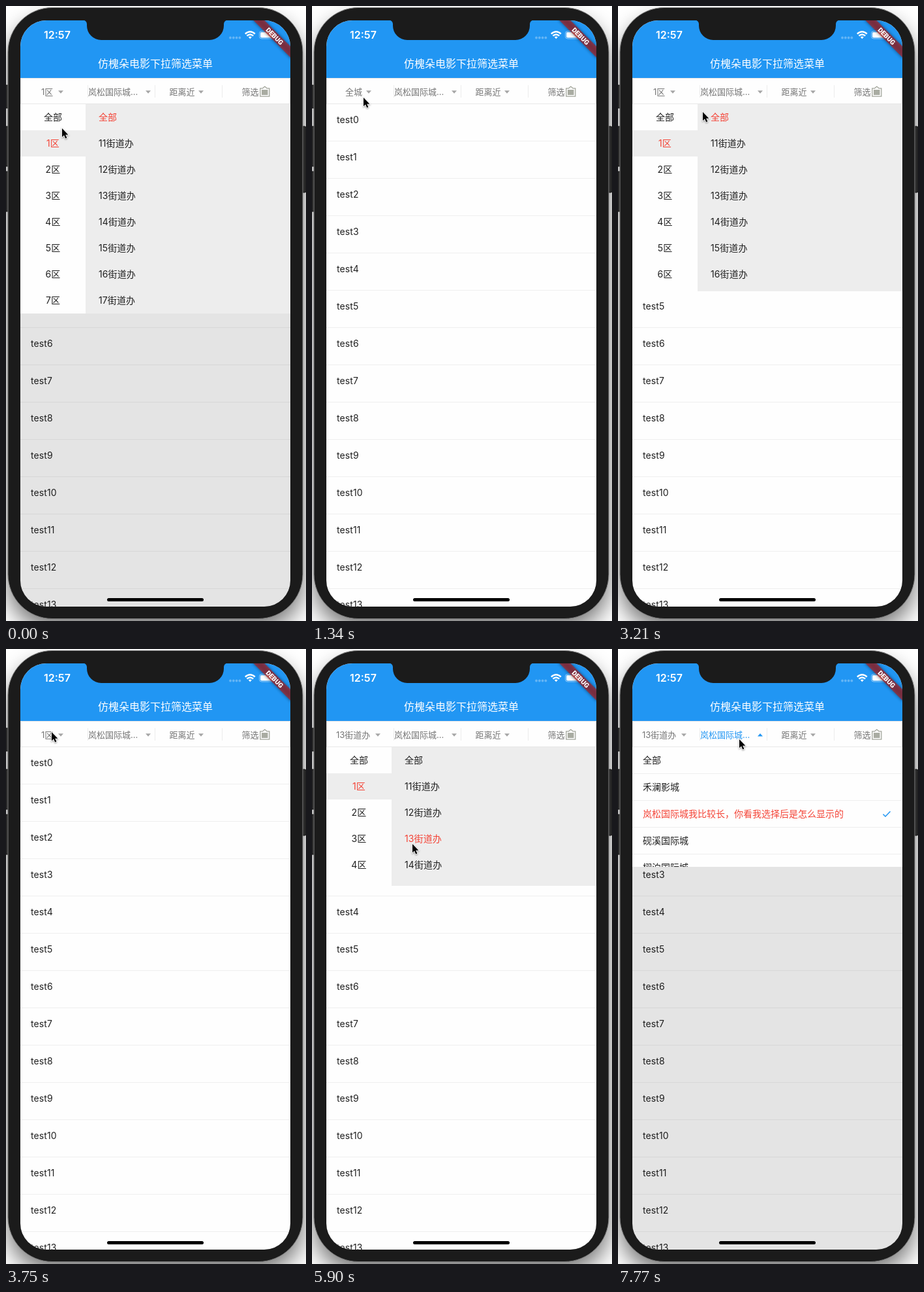
Recreate the animation shown at these times as an HTML page. Size 460 px wide and 940 px high, loop 8000 ms.

```html
<!DOCTYPE html>
<html lang="zh-CN">
<head>
<meta charset="utf-8">
<title>下拉筛选菜单</title>
<style>
  html, body { margin: 0; width: 100%; height: 100%; overflow: hidden; background: #fff; }
  svg { display: block; width: 460px; height: 940px; }
  text { font-family: Inter, "Noto Sans CJK SC", "Noto Sans CJK", sans-serif; font-size: 14px; fill: #212121; white-space: pre; }
  .mid { text-anchor: middle; }
  .spaced text { letter-spacing: .12px; }
  .tab { font-size: 13px; fill: #757575; }
  .caret { fill: #a6a6a6; }
  .on.tab, .on.caret { fill: #2196f3; }
  .red { fill: #f44336; }
</style>
</head>
<body>
<svg viewBox="0 0 460 940">
  <defs>
    <clipPath id="screen"><rect x="22" y="22" width="414" height="896" rx="40"/></clipPath>
    <clipPath id="reveal"><rect id="revealBox" x="22" y="150" width="414" height="0"/></clipPath>
    <filter id="blur" x="-20%" y="-20%" width="140%" height="140%"><feGaussianBlur stdDeviation="17"/></filter>
    <filter id="soft" x="-20%" y="-100%" width="140%" height="300%"><feGaussianBlur stdDeviation="2.5"/></filter>
  </defs>

  <rect width="460" height="940" fill="#fff"/>
  <rect x="3" y="22" width="452" height="930" rx="68" opacity=".55" filter="url(#blur)"/>
  <g fill="#2b2b2b" stroke="#111" stroke-width="1">
    <rect x="-3" y="121" width="8" height="35" rx="1.5"/>
    <rect x="-3" y="184" width="8" height="61" rx="1.5"/>
    <rect x="-3" y="253" width="8" height="61" rx="1.5"/>
    <rect x="453" y="184" width="7" height="101" rx="2"/>
  </g>
  <rect x="3" y="2.5" width="452" height="934" rx="68" fill="#1b1b1b" stroke="#7d7d7d" stroke-width="1"/>

  <g clip-path="url(#screen)">
    <rect x="22" y="22" width="414" height="896" fill="#fefefe"/>
    <g id="list" class="spaced"></g>
    <rect id="scrim" x="22" y="150" width="414" height="768" fill="#000" fill-opacity=".1"/>
    <g clip-path="url(#reveal)">
      <g id="areaMenu" class="spaced"></g>
      <g id="cinemaMenu"></g>
    </g>

    <rect x="22" y="22" width="414" height="88" fill="#2196f3"/>
    <text x="229" y="94" class="mid" style="font-size:16px;fill:#fff">仿槐朵电影下拉筛选菜单</text>
    <text x="58" y="50" style="font-size:16px;font-weight:600;fill:#fff">12:57</text>
    <g fill="#64b5f6" id="signal"></g>
    <g fill="none" stroke="#fff" stroke-width="2.4">
      <path d="M366.8 42.6Q374.3 35.8 381.8 42.6M369.4 45.6Q374.3 41.2 379.2 45.6"/>
      <path d="M374.3 50.2L371.8 47.6Q374.3 45.5 376.8 47.6Z" fill="#fff" stroke="none"/>
    </g>
    <rect x="388.5" y="38.5" width="23" height="11.5" rx="3.5" fill="none" stroke="#fff" stroke-opacity=".5"/>
    <rect x="390" y="40" width="20" height="8.5" rx="2" fill="#fff"/>
    <g transform="translate(436 22) rotate(45)">
      <rect x="-42" y="28" width="84" height="12" fill="#000" opacity=".5" filter="url(#soft)"/>
      <rect x="-42" y="28" width="84" height="12" fill="#b71c1c" fill-opacity=".627"/>
      <text y="37.7" class="mid" style="font-family:Roboto,sans-serif;font-size:10.2px;font-weight:900;fill:#fff">DEBUG</text>
    </g>

    <rect x="22.5" y="110.5" width="413" height="39" fill="#fefefe" stroke="#e8e8e8"/>
    <path d="M125.5 121V140M228.5 121V140M331.5 121V140" stroke="#ececec"/>
    <text id="areaTab" class="tab" y="136"></text>
    <path id="areaCaret" class="caret"/>
    <text id="cinemaTab" class="tab" x="126" y="136">岚松国际城...</text>
    <path id="cinemaCaret" class="caret"/>
    <text class="tab" x="250.5" y="136">距离近</text>
    <path id="sortCaret" class="caret"/>
    <text class="tab" x="361.5" y="136">筛选</text>
    <path d="M389.8 125.8H393.5L396.8 123L400.1 125.8H403.8V138.2H389.8Z" fill="none" stroke="#a2a59b" stroke-width="1.3"/>
    <rect x="392" y="128" width="9.5" height="8" fill="#a9aca2"/>
  </g>

  <path d="M118 21.5A6 6 0 0 1 124 27.500V30A22 22 0 0 0 146 52H312A22 22 0 0 0 334 30V27.500A6 6 0 0 1 340 21.500Z" fill="#1b1b1b"/>
  <rect x="155" y="905" width="148" height="5" rx="2.5"/>
  <g id="cursor">
    <path d="M0 -1V12.300L3 9.600L5.200 14.500L7.400 13.500L5.200 8.800H9.400Z"
          stroke="#fff" stroke-width="1.6" style="paint-order:stroke;filter:drop-shadow(0 1px 1px #0006)"/>
  </g>
</svg>

<script>
const LOOP = 8000, TOP = 150;
const $ = id => document.getElementById(id);
const range = n => [...Array(n).keys()];
const text = (x, y, s, cls = '') => `<text x="${x}" y="${y}" class="${cls}">${s}</text>`;
const rect = (x, y, w, h, fill) => `<rect x="${x}" y="${y}" width="${w}" height="${h}" fill="${fill}"/>`;

const CURSOR = [
  [0, 86, 188], [270, 78, 174], [540, 77, 169], [800, 79, 153], [1070, 81, 142], [1340, 79, 141],
  [1610, 80, 174], [1880, 82, 195], [2150, 81, 199], [2420, 82, 198], [2680, 125, 181],
  [2950, 148, 171], [3210, 130, 163], [3480, 85, 143], [3750, 70, 128], [4280, 71, 129],
  [4550, 113, 186], [4820, 162, 229], [5090, 155, 257], [5360, 154, 298], [5630, 154, 299],
  [6170, 157, 89], [6700, 189, 147], [6960, 176, 142], [7230, 186, 137], [7500, 186, 138], [7770, 186, 139]
];

// Each step changes only the fields it names.
const STEPS = [
  [0, { tab: '1区', active: '', menu: 'area', height: 320, scrim: true, left: 1, right: 0 }],
  [800, { tab: '全城', height: 158, scrim: false, left: 0 }],
  [1070, { height: 0 }],
  [1610, { active: 'area', height: 100, scrim: true }],
  [1880, { height: 279 }],
  [2150, { height: 320 }],
  [2420, { left: 1 }],
  [3210, { tab: '1区', active: '', height: 286, scrim: false }],
  [3480, { height: 107 }],
  [3750, { height: 0 }],
  [4280, { active: 'area', height: 200, scrim: true }],
  [4550, { height: 320 }],
  [5900, { tab: '13街道办', active: '', height: 212, scrim: false, right: 3 }],
  [6170, { height: 33 }],
  [6430, { height: 0 }],
  [7500, { active: 'cinema', menu: 'cinema', height: 2, scrim: true }],
  [7770, { height: 183 }]
];

// Label start and caret start for each caption of the first tab.
const TAB_X = { '1区': [54, 80], '全城': [51, 83], '13街道办': [37, 97] };
const CINEMAS = ['全部', '禾澜影城', '岚松国际城我比较长\uff0c你看我选择后是怎么显示的', '砚溪国际城', '栩泊国际城'];

function drawList() {
  $('list').innerHTML = range(14).map(i =>
    text(38, 179 + 57 * i, 'test' + i) + rect(22, 206 + 57 * i, 414, 1, '#efefef')).join('');
}

function drawAreaMenu({ left, right }) {
  const rows = range(8).map(i => {
    const y = TOP + 40 * i;
    const street = i ? `1${i}街道办` : '全部';
    return (i === left ? '' : rect(22, y, 100, 40, '#fefefe')) +
      text(72, y + 25, i ? i + '区' : '全部', i === left ? 'mid red' : 'mid') +
      (left ? text(142, y + 25, street, i === right ? 'red' : '') : '');
  });
  $('areaMenu').innerHTML = rect(22, TOP, 414, 320, '#ededed') + rows.join('');
}

function drawCinemaMenu() {
  $('cinemaMenu').innerHTML = rect(22, TOP, 414, 205, '#fefefe') +
    CINEMAS.map((name, i) => text(38, 175 + 41 * i, name, i === 2 ? 'red' : '') +
      rect(22, 190 + 41 * i, 414, 1, '#eeeeee')).join('') +
    '<path d="M406.5 252.5L410 256L417.5 248.2" fill="none" stroke="#2196f3" stroke-width="1.5"/>';
}

function setCaret(id, x, up) {
  $(id).setAttribute('d', up ? `M${x} 133.5h8l-4 -4.5z` : `M${x} 129.3h8l-4 4.5z`);
  $(id).classList.toggle('on', up);
}

const show = (id, on) => { $(id).style.display = on ? '' : 'none'; };
const indexAt = (table, t) => table.findLastIndex(([start]) => start <= t);

function drawState(s) {
  const [labelX, caretX] = TAB_X[s.tab];
  $('areaTab').textContent = s.tab;
  $('areaTab').setAttribute('x', labelX);
  $('areaTab').classList.toggle('on', s.active === 'area');
  $('cinemaTab').classList.toggle('on', s.active === 'cinema');
  setCaret('areaCaret', caretX, s.active === 'area');
  setCaret('cinemaCaret', 214, s.active === 'cinema');
  drawAreaMenu(s);
  show('areaMenu', s.menu === 'area');
  show('cinemaMenu', s.menu === 'cinema');
  show('scrim', s.scrim);
  $('revealBox').setAttribute('height', s.height);
}

let shown = -1;
function frame() {
  const t = performance.now() % LOOP;
  const [, x, y] = CURSOR[indexAt(CURSOR, t)];
  $('cursor').setAttribute('transform', `translate(${x} ${y})`);
  const step = indexAt(STEPS, t);
  if (step !== shown) {
    shown = step;
    drawState(Object.assign({}, ...STEPS.slice(0, step + 1).map(([, fields]) => fields)));
  }
  requestAnimationFrame(frame);
}

$('signal').innerHTML = range(4).map(i => `<circle cx="${344 + 4.8 * i}" cy="48.5" r="1.9"/>`).join('');
setCaret('sortCaret', 295, false);
drawList();
drawCinemaMenu();
frame();
</script>
</body>
</html>
```
